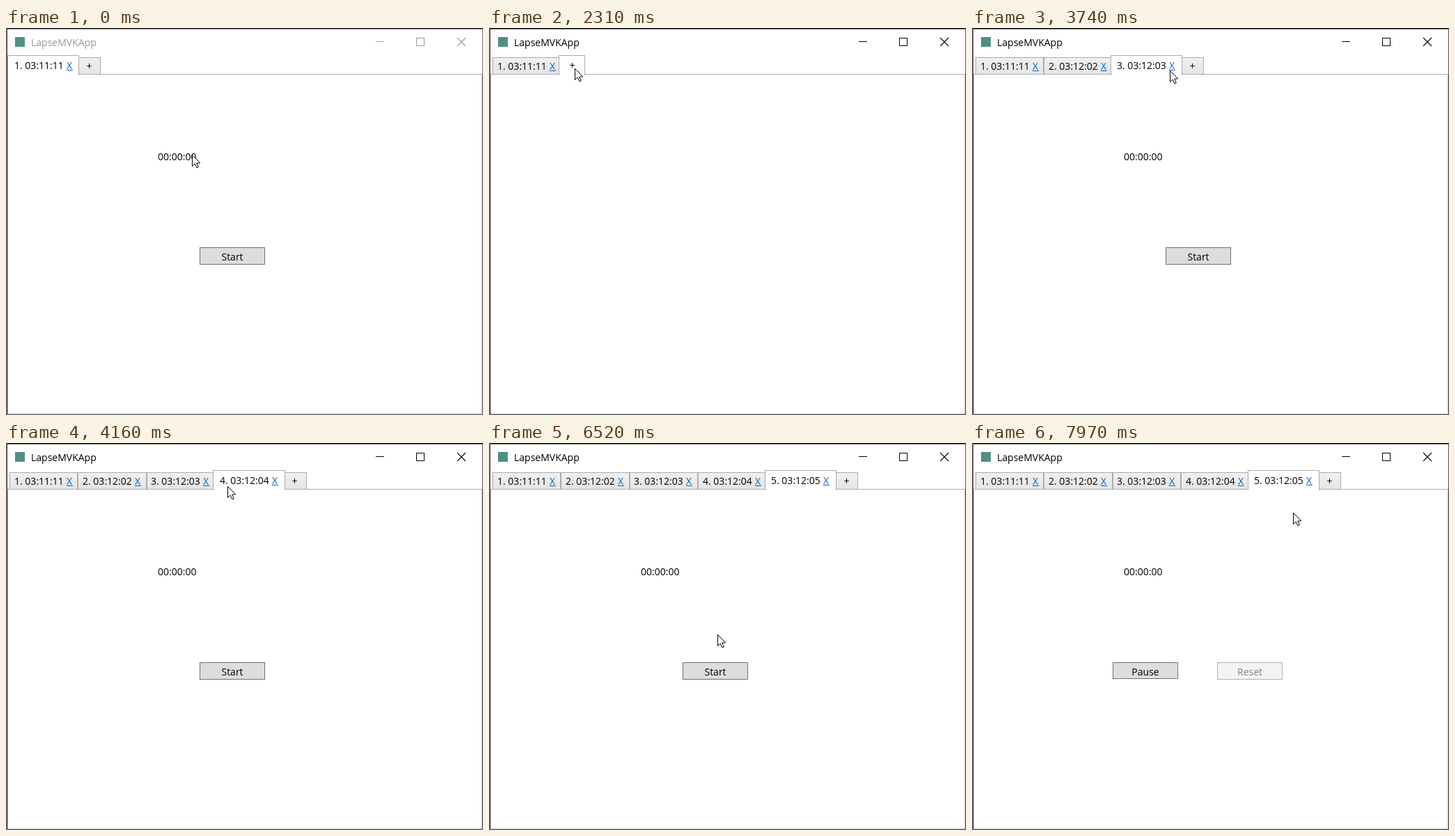
These frames come from a looping animation (685x556 px, 8 s). An HTML page with a canvas:

```html
<!DOCTYPE html>
<html lang="en">
<head>
<meta charset="utf-8">
<title>LapseMVKApp</title>
<style>
html, body { margin: 0; width: 100%; height: 100%; overflow: hidden; background: #fff; }
canvas { display: block; width: 685px; height: 556px; }
</style>
</head>
<body>
<canvas id="stage" width="685" height="556"></canvas>
<script>
const ctx = document.getElementById('stage').getContext('2d');
const LOOP = 8000;
const FONT = '14px "Open Sans", "Noto Sans", sans-serif';
const TICK = 130;           // screen refresh
const BLANK = 120;          // empty page before a new tab opens
const CLICKS = [2310, 3350, 4010, 4820];
const PRESS_AT = 7180, RUN_AT = 7330;

// Pointer moves, each from where the last one ended
const HOME = { x: 267, y: 182 };
const MOVES = [
  { from: 960, to: 1750, x: 123, y: 58 },
  { from: 2860, to: 3230, x: 221, y: 59 },
  { from: 3490, to: 3860, x: 318, y: 62 },
  { from: 4180, to: 4550, x: 416, y: 57 },
  { from: 5710, to: 6120, x: 414, y: 62 },
  { from: 6520, to: 6520, x: 328, y: 275 },
  { from: 6520, to: 7060, x: 321, y: 327 },
  { from: 7450, to: 7970, x: 461, y: 100 }
];

const easeOut = (u, power) => 1 - Math.pow(1 - u, power);

function pointerAt(t) {
  const sampled = Math.floor(t / TICK) * TICK;
  let p = HOME;
  for (const m of MOVES) {
    if (t >= m.to) { p = m; continue; }
    const u = Math.max(0, (sampled - m.from) / (m.to - m.from));
    return {
      x: Math.round(p.x + (m.x - p.x) * easeOut(u, 2)),
      y: Math.round(p.y + (m.y - p.y) * easeOut(u, 2.4))
    };
  }
  return p;
}

function fill(x, y, w, h, color) {
  ctx.fillStyle = color;
  ctx.fillRect(x, y, w, h);
}

function box(x, y, w, h, border, inside) {
  fill(x, y, w, h, border);
  fill(x + 1, y + 1, w - 2, h - 2, inside);
}

function text(str, x, y, color = '#000', align = 'left') {
  ctx.font = FONT;
  ctx.textAlign = align;
  ctx.fillStyle = color;
  ctx.fillText(str, x, y);
}

function within(p, x, y, w, h) {
  return p.x >= x && p.x < x + w && p.y >= y && p.y < y + h;
}

function drawWindow(active) {
  const ink = active ? '#000' : '#999';
  const edge = active ? '#555' : '#707070';
  fill(0, 0, 685, 556, '#fff');
  fill(0, 0, 685, 1, '#111');
  fill(0, 0, 1, 556, '#777');
  fill(1, 1, 684, 1, edge);
  fill(1, 1, 1, 555, '#3c3c3c');
  fill(684, 1, 1, 555, edge);
  fill(1, 555, 684, 1, edge);
  fill(13, 13, 14, 14, '#4f8f84');
  text('LapseMVKApp', 36, 26, ink);

  fill(531, 19, 12, 1, ink);
  box(589, 14, 12, 12, ink, '#fff');
  ctx.strokeStyle = ink;
  ctx.lineWidth = 1.1;
  ctx.beginPath();
  ctx.moveTo(648, 14);
  ctx.lineTo(660, 26);
  ctx.moveTo(660, 14);
  ctx.lineTo(648, 26);
  ctx.stroke();
  box(2, 66, 682, 489, '#acacac', '#fff');
}

const slot = i => 5 + 98.4 * i;

function drawTabShape(x, right, selected, hover) {
  if (selected) {
    box(x - 3, 39, right - x + 5, 29, '#acacac', '#fff');
    fill(x - 2, 66, right - x + 3, 2, '#fff');
    return;
  }
  const shade = ctx.createLinearGradient(0, 43, 0, 66);
  shade.addColorStop(0, hover ? '#ecf4fc' : '#f0f0f0');
  shade.addColorStop(1, hover ? '#dcecfc' : '#e5e5e5');
  box(x, 42, right - x, 25, hover ? '#7eb4ea' : '#acacac', shade);
  fill(x, 66, right - x, 1, '#acacac');
}

function drawTab(i, selected) {
  const x = Math.floor(slot(i)) + 7, base = selected ? 59 : 60;
  const stamp = i ? `03:12:0${i + 1}` : '03:11:11';
  drawTabShape(Math.round(slot(i)), Math.round(slot(i + 1)), selected, false);
  text(`${i + 1}. ${stamp}`, x, base);
  text('X', x + 75, base, '#0066cc');
  fill(x + 75, base + 1, 9, 1, '#0066cc');
}

function drawPlus(count, selected, p) {
  const x = Math.round(slot(count)), right = Math.round(slot(count) + 33);
  drawTabShape(x, right, selected, within(p, x, 42, right - x, 25));
  text('+', Math.floor(slot(count)) + 16.5, selected ? 59 : 60, '#000', 'center');
}

function drawTabs(count, plusOn, p) {
  const chosen = plusOn ? count : count - 1;
  const draw = i => i === count ? drawPlus(count, plusOn, p) : drawTab(i, i === chosen);
  for (let i = 0; i <= count; i++) if (i !== chosen) draw(i);
  draw(chosen);
}

const LOOKS = {
  normal: ['#707070', '#ddd', '#000'],
  hover: ['#3c7fb1', '#bee6fd', '#000'],
  pressed: ['#2c628b', '#c4e5f6', '#000'],
  disabled: ['#adb2b5', '#f4f4f4', '#838383']
};

function drawButton(label, x, look, h = 25) {
  const [border, back, ink] = LOOKS[look];
  box(x, 315, 94, h, border, back);
  text(label, x + 47, 334, ink, 'center');
}

function drawContent(t, p) {
  text('00:00:00', 218, 190);
  if (t >= RUN_AT) {
    drawButton('Pause', 202, 'normal', 24);
    drawButton('Reset', 352, 'disabled');
  } else {
    const over = within(p, 278, 315, 94, 25);
    drawButton('Start', 278, t >= PRESS_AT ? 'pressed' : over ? 'hover' : 'normal');
  }
}

function drawPointer({ x, y }) {
  ctx.save();
  ctx.translate(x + 0.5, y + 0.5);
  const arrow = new Path2D('M0 0V16L3.7 12.6 6.4 18.4 8.8 17.4 6.2 11.6 11.2 11.4Z');
  ctx.fillStyle = '#fff';
  ctx.fill(arrow);
  ctx.strokeStyle = '#000';
  ctx.lineWidth = 1;
  ctx.stroke(arrow);
  ctx.restore();
}

function render(t) {
  const p = pointerAt(t);
  const count = 1 + CLICKS.filter(c => t >= c + BLANK).length;
  const plusOn = CLICKS.some(c => t >= c && t < c + BLANK);
  drawWindow(t >= CLICKS[0]);
  drawTabs(count, plusOn, p);
  if (!plusOn) drawContent(t, p);
  drawPointer(p);
}

const start = performance.now();
function frame() {
  render((performance.now() - start) % LOOP);
  requestAnimationFrame(frame);
}
frame();
</script>
</body>
</html>
```
